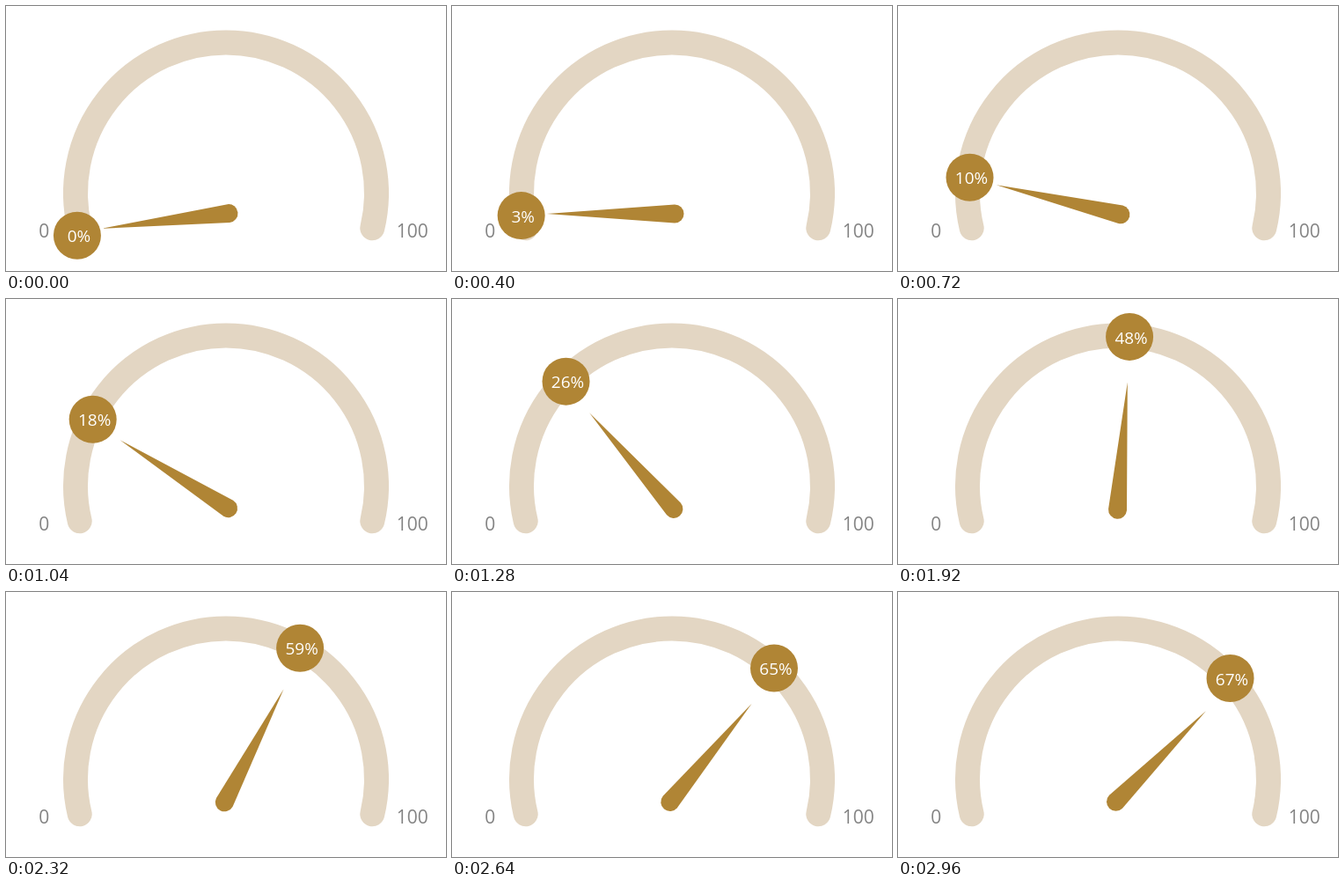
These frames come from a looping animation (500 by 301 pixels, 3040 ms). An HTML page:

```html
<!DOCTYPE html>
<html lang="en">
<head>
<meta charset="utf-8">
<title>Gauge</title>
<style>
  html, body { margin: 0; width: 100%; height: 100%; overflow: hidden; background: #fff; }
  svg { display: block; width: 500px; height: 301px; font-family: "Open Sans", "Noto Sans", sans-serif; }
  .track { fill: none; stroke: #e3d6c3; stroke-width: 28; stroke-linecap: round; }
  .scale { fill: #848484; font-size: 21px; }
  .gold { fill: #b08535; }
  #label { fill: #fff; font-size: 19px; text-anchor: middle; }
</style>
</head>
<body>
<svg viewBox="0 0 500 301">
  <path class="track" d="M83.7 252.3A171 171 0 1 1 416.3 252.3"/>
  <text class="scale" x="37.2" y="262.8">0</text>
  <text class="scale" x="443.8" y="262.8">100</text>
  <path id="needle" class="gold" d="M-142 0L3.2 -10.5A10.5 10.5 0 1 1 3.2 10.5Z"/>
  <g id="ball">
    <circle class="gold" r="27"/>
    <text id="label" x="2" y="7.6"></text>
  </g>
</svg>
<script>
  const LOOP = 3040, STEP = 80, MAX = 67;
  const needle = document.getElementById('needle');
  const ball = document.getElementById('ball');
  const label = document.getElementById('label');
  const start = performance.now();

  function draw(ms) {
    const t = Math.floor(ms / STEP) * STEP;
    const value = MAX / 2 * (1 - Math.cos(Math.PI * (t + 29) / LOOP));

    // The ball starts slightly outside the track and settles onto it.
    const radius = 171 + 6 * Math.max(0, 1 - value / 8);
    const angle = (2.285 * value - 15.5) * Math.PI / 180;
    const x = 251.5 - radius * Math.cos(angle);
    const y = 213.5 - radius * Math.sin(angle);

    ball.setAttribute('transform', `translate(${x} ${y})`);
    needle.setAttribute('transform', `translate(249.8 236) rotate(${2.115 * value - 6.8})`);
    label.textContent = Math.round(value) + '%';
  }

  function tick() {
    draw((performance.now() - start) % LOOP);
    requestAnimationFrame(tick);
  }
  tick();
</script>
</body>
</html>
```
